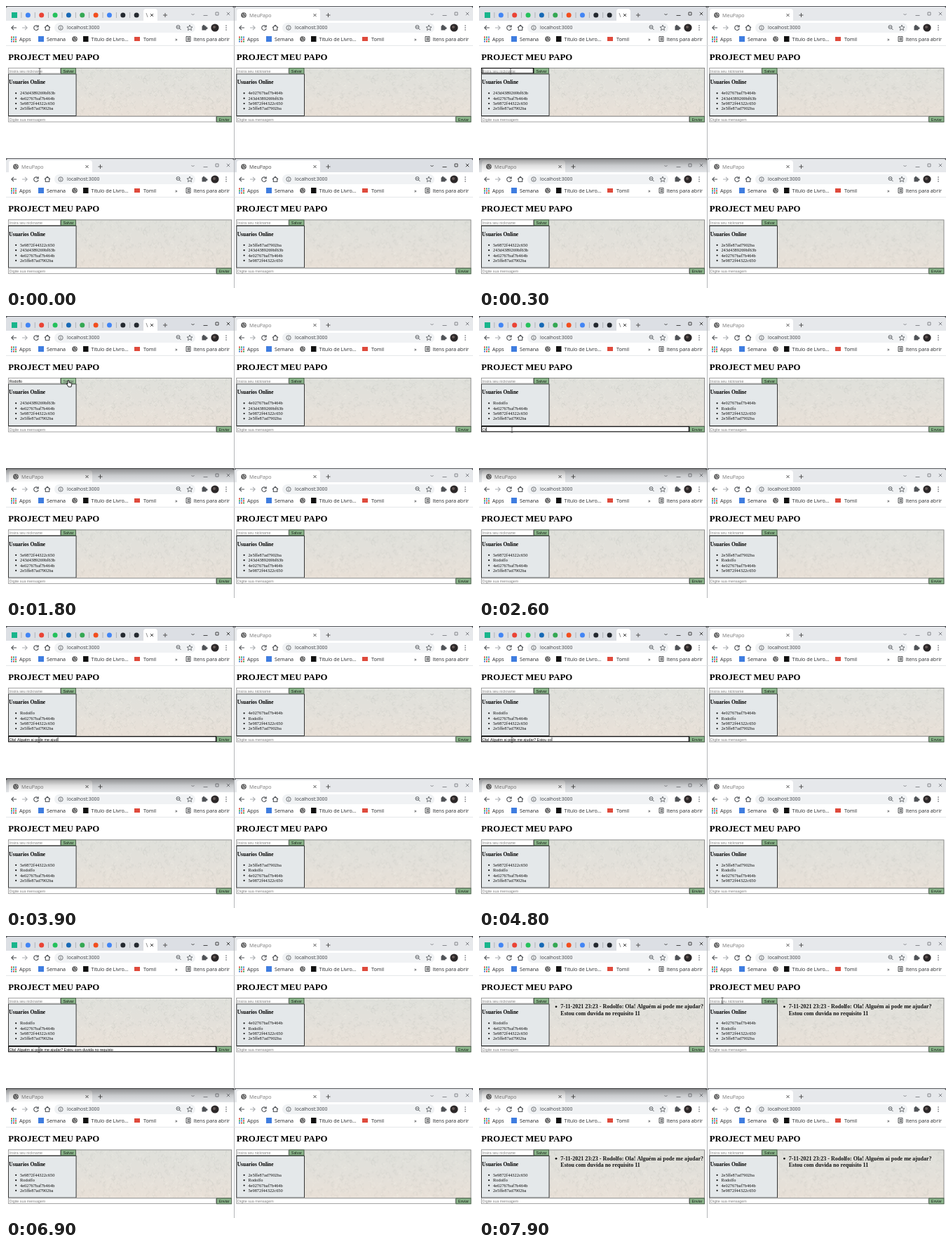
Write an HTML page with a canvas that moves like this. It is 666 by 402 pixels and loops after 8 s.

```html
<!DOCTYPE html>
<html lang="pt">
<head>
<meta charset="utf-8">
<title>Chat demo</title>
<style>
html, body { margin: 0; width: 666px; height: 402px; overflow: hidden; }
canvas { display: block; }
</style>
</head>
<body>
<canvas id="stage" width="666" height="402"></canvas>
<script>
const g = document.getElementById('stage').getContext('2d');
const UI = '"Open Sans", "Noto Sans", sans-serif';
const SERIF = '"Liberation Serif", serif';
const SANS = '"Liberation Sans", sans-serif';
const NAME = 'Rodolfo';
const FIRST = 'Ola! Alguém ai pode me ajudar?';
const DRAFT = FIRST + ' Estou com duvida no requisto';
const SECOND = 'Estou com duvida no requisito 11';
const IDS = ['243d4389269bf63b', '4e02767baf7b464b', '5e9872f44322c650', '2e5ffe87ad7902ba'];
// Listed from back to front
const WINDOWS = [
  { x: 0, y: 216, w: 325, order: [2, 0, 1, 3] },
  { x: 0, y: 0, w: 325, order: [0, 1, 2, 3], tabs: true },
  { x: 325, y: 0, w: 341, order: [1, 0, 2, 3] },
  { x: 325, y: 216, w: 341, order: [3, 0, 1, 2] }
];
const TAB_COLORS = ['#19b58c', '#4285f4', '#ea4335', '#25c15c', '#1769b5',
  '#34a853', '#f24e1e', '#4285f4', '#24292f', '#24292f'];
// [time, value...] keys, linear in between
const TYPING = [[2500, 0], [2700, 4], [3000, 8], [3900, 27], [4900, 40], [5800, 51], [6200, 59], [6900, 59], [7000, 57], [7200, 63]];
const MOUSE = [[0, 48, 93], [300, 45, 93], [1200, 45, 93], [1700, 88, 96], [2000, 88, 96],
  [2400, 47, 162], [7200, 47, 162], [7500, 311, 162], [7600, 311, 162], [7900, 347, 92]];

function at(keys, t) {
  const i = keys.findIndex(k => k[0] > t);
  if (i < 0) return keys[keys.length - 1].slice(1);
  if (i === 0) return keys[0].slice(1);
  const a = keys[i - 1], b = keys[i], p = (t - a[0]) / (b[0] - a[0]);
  return a.slice(1).map((v, j) => v + (b[j + 1] - v) * p);
}

function text(s, x, y, size, color, family = UI, weight = '') {
  g.font = `${weight} ${size}px ${family}`;
  g.fillStyle = color;
  g.fillText(s, x, y);
}

function box(x, y, w, h, fill, stroke, lw = 1) {
  if (fill) { g.fillStyle = fill; g.fillRect(x, y, w, h); }
  if (stroke) {
    g.strokeStyle = stroke;
    g.lineWidth = lw;
    g.strokeRect(x + lw / 2, y + lw / 2, w - lw, h - lw);
  }
}

function round(x, y, w, h, r, fill) {
  g.beginPath();
  g.roundRect(x, y, w, h, r);
  g.fillStyle = fill;
  g.fill();
}

function dot(x, y, r, fill) {
  g.beginPath();
  g.arc(x, y, r, 0, 7);
  g.fillStyle = fill;
  g.fill();
}

function path(d, x, y, color, lw = 1) {
  g.save();
  g.translate(x, y);
  g.strokeStyle = color;
  g.lineWidth = lw;
  g.stroke(new Path2D(d));
  g.restore();
}

const cross = (x, y, r, color) => path(`M${-r} ${-r}L${r} ${r}M${r} ${-r}L${-r} ${r}`, x, y, color);
const plus = (x, y) => path('M-3 0H3M0-3V3', x, y, '#555');

function globe(x, y) {
  dot(x, y, 3.8, '#555');
  path('M-2-2Q0 0-1 2M1-3Q0-1 3 0M0 3Q1 1 2 1', x, y, '#eee', 0.9);
}

function makeWallpaper() {
  const c = document.createElement('canvas');
  c.width = 240;
  c.height = 70;
  const p = c.getContext('2d');
  const grad = p.createLinearGradient(0, 0, 0, 70);
  grad.addColorStop(0, '#dfe0db');
  grad.addColorStop(0.5, '#e3e0da');
  grad.addColorStop(1, '#e9e0d7');
  p.fillStyle = grad;
  p.fillRect(0, 0, 240, 70);
  let seed = 7;
  const rnd = () => (seed = seed * 16807 % 2147483647) / 2147483647;
  p.lineWidth = 0.6;
  for (let i = 0; i < 800; i++) {
    p.strokeStyle = i % 2 ? 'rgba(150,160,155,.18)' : 'rgba(250,246,238,.3)';
    const a = rnd() * 6;
    p.beginPath();
    p.arc(rnd() * 240, rnd() * 70, 1 + rnd() * 2, a, a + 2 + rnd() * 3);
    p.stroke();
  }
  return c;
}
const wallpaper = makeWallpaper();

function drawTabs(win, active) {
  const ink = active ? '#444' : '#85878c', r = win.w - 325;
  if (win.tabs) {
    TAB_COLORS.forEach((color, i) => {
      const x = 12 + i * 19.35;
      if (i === 0) box(x - 4, 9, 8, 8, color);
      else dot(x, 13, 3.5, color);
      if (i < 9) box(x + 9.5, 9, 0.8, 8, '#a3a7ac');
    });
    round(196, 4, 20, 18, [4, 4, 0, 0], '#fff');
    path('M0-3L2 3', 200, 13, '#777', 0.8);
    cross(208, 13, 2, '#444');
    plus(227, 13);
  } else {
    round(4, 4, 119, 18, [4, 4, 0, 0], '#fff');
    globe(14, 13);
    text('MeuPapo', 22, 15.7, 7.1, active ? '#444' : '#777');
    cross(115.5, 13, 2, '#555');
    plus(134.5, 13);
  }
  path('M-2-1L0 1L2-1', 266.5 + r, 12, ink);
  path('M-3 1.5H3', 284.5 + r, 12, ink);
  path('M-2-2H2V2H-2Z', 301 + r, 11, ink);
  cross(317 + r, 11, 2.2, ink);
}

function drawToolbar(r) {
  const ink = '#505357';
  path('M4 0H-3M0-3.2L-3.2 0L0 3.2', 11, 31, ink, 1.1);
  path('M-4 0H3M0-3.2L3.2 0L0 3.2', 27, 31, '#aaadb1', 1.1);
  path('M2.5-2A3.3 3.3 0 1 0 3.2 1M3.2-3.7V-1H.4', 43, 31, ink, 1.1);
  path('M-4 0L0-3.7L4 0M-2.7-.5V3.5H2.7V-.5', 59, 31, ink, 1.1);
  round(69, 24, 201 + r, 14, 7, '#f0f2f4');
  path('M3.2 0A3.2 3.2 0 1 1-3.2 0A3.2 3.2 0 1 1 3.2 0M0-.5V2M0-2V-1.2', 78, 31, ink, 0.8);
  text('localhost:3000', 87, 33.4, 6.9, '#3c3f43');
  path('M2 0A2.5 2.5 0 1 1-3 0A2.5 2.5 0 1 1 2 0M1.3 1.8L3.5 4M-1.8 0H.8', 246 + r, 30, ink, 0.9);
  path('M0-4L1.1-1.2L4-1L1.8.8L2.5 3.7L0 2L-2.5 3.7L-1.8.8L-4-1L-1.1-1.2Z', 262 + r, 31, ink, 0.8);
  box(279.5 + r, 28.5, 6, 6, ink);
  dot(282 + r, 28.3, 1.5, ink);
  dot(286 + r, 31.5, 1.5, ink);
  dot(298 + r, 31, 5.6, '#2c2829');
  dot(297 + r, 30, 2, '#665a58');
  for (let i = -1; i < 2; i++) dot(314 + r, 31 + i * 3, 0.8, ink);
}

function drawBookmarks(r) {
  const ink = '#25272a';
  const label = (s, x) => text(s, x, 49.7, 7.2, ink, UI, 500);
  const colors = ['#e0483b', '#35a45a', '#4a80d8'];
  for (let i = 0; i < 9; i++) box(7 + i % 3 * 3, 43.5 + (i / 3 | 0) * 3, 2, 2, colors[(i + (i / 3 | 0)) % 3]);
  label('Apps', 19);
  box(46, 43, 8, 8, '#3f7de0');
  label('Semana', 58);
  globe(98, 47);
  box(110, 43, 7.5, 8, '#111');
  label('Título de Livro…', 121.5);
  box(183, 44, 8, 6, '#df4a3c');
  label('Tomil', 196);
  label('»', 241 + r);
  path('M-3-3.5H3V3.5H-3ZM-1.5-1.5H2M-1.5 0H2M-1.5 1.5H2', 260 + r, 47, ink, 0.8);
  label('Itens para abrir', 267.5 + r);
  box(0, 56, 325 + r, 0.8, '#dfe1e4');
}

function field(x, y, w, value, hint, focused, caret) {
  box(x, y, w, 8.5, '#fff', focused ? '#111' : '#8c8c8c', focused ? 1.2 : 0.8);
  text(value || hint, x + 1.7, y + 6.5, 5.33, value ? '#111' : '#858585', SANS);
  if (caret) box(x + 2 + (value ? g.measureText(value).width : 0), y + 1.7, 0.7, 5.5, '#111');
}

function button(label, x, y, pressed) {
  box(x, y, 22, 8.7, pressed ? '#9cc49c' : '#8ab58a', '#4c5a4c', 0.9);
  g.textAlign = 'center';
  text(label, x + 11, y + 6.5, 5.33, pressed ? '#555' : '#1b241b', SANS);
  g.textAlign = 'left';
}

function drawPage(win, s) {
  const r = win.w - 325, mine = win.tabs;
  g.translate(win.x ? 0.4 : 0, win.y ? 0.5 : 0);
  text('PROJECT MEU PAPO', 3.3, 76.6, 12.8, '#000', SERIF, 'bold');
  g.drawImage(wallpaper, 0, 0, 222 + r, 69, 100, 88, 222 + r, 69);
  box(3, 88, 319 + r, 69.5, null, '#777', 0.8);
  box(3, 96.5, 97.5, 60.5, '#e4e8ea', '#222', 0.9);
  field(3, 88, 75, mine ? s.nick : '', 'Insira seu nickname', mine && s.nickFocus, mine && s.nickFocus);
  button('Salvar', 78, 88, mine && s.pressed);
  text('Usuarios Online', 4.3, 111.3, 7.5, '#000', SERIF, 'bold');
  win.order.forEach((id, i) => {
    const y = 126.3 + i * 7.35;
    dot(14.2, y - 2, 1.1, '#111');
    text(id === 0 && s.named ? NAME : IDS[id], 20, y, 6.4, '#111', SERIF);
  });
  field(3, 157, 297 + r, mine ? s.message : '', 'Digite sua mensagem', mine && s.messageFocus, mine && s.caret);
  button('Enviar', 300 + r, 157);
  if (s.sent) {
    dot(110, 100.8, 1.4, '#111');
    text(`7-11-2021 23:23 - ${NAME}: ${FIRST}`, 116.3, 103.4, 8, '#111', SERIF, 'bold');
    text(SECOND, 116.3, 112.6, 8, '#111', SERIF, 'bold');
  }
}

function drawShadow(w) {
  const grad = g.createLinearGradient(0, 217, 0, 238);
  grad.addColorStop(0, 'rgba(0,0,0,.42)');
  grad.addColorStop(0.5, 'rgba(0,0,0,.12)');
  grad.addColorStop(1, 'rgba(0,0,0,0)');
  box(0, 217, w, 21, grad);
}

function drawWindow(win, active, s) {
  const top = win.y ? 2 : 1, left = win.x ? 1 : 0;
  g.save();
  g.translate(win.x, win.y);
  if (active) drawShadow(win.w);
  round(left, top, win.w - left, 217 - top, [4, 4, 0, 0], '#fff');
  round(left, top, win.w - left, 21 - top, [4, 4, 0, 0], active ? '#dcdfe4' : '#e6e8eb');
  drawTabs(win, active);
  drawToolbar(win.w - 325);
  drawBookmarks(win.w - 325);
  drawPage(win, s);
  g.restore();
}

function drawMouse(x, y) {
  const onButton = (x > 78 && x < 100 && y < 97) || (x > 300 && x < 322 && y > 157);
  const onField = y < 97 || (y > 157 && x < 300);
  if (onButton) {
    const hand = new Path2D(`M${x} ${y - 4}v5l-2-1 3 5h4l1-5-4-1v-3z`);
    g.fillStyle = '#fff';
    g.fill(hand);
    g.strokeStyle = '#111';
    g.lineWidth = 0.9;
    g.stroke(hand);
  } else if (onField) {
    path('M-1.5-4H1.5M0-4V4M-1.5 4H1.5', x, y, '#444', 0.8);
  } else {
    const arrow = new Path2D(`M${x} ${y}v8l2-2 1.5 3 1-.5-1.3-3h2.8z`);
    g.fillStyle = '#111';
    g.fill(arrow);
  }
}

function messageAt(t) {
  if (t >= 7600) return '';
  const n = Math.round(at(TYPING, t)[0]);
  return (t < 7000 ? DRAFT : FIRST + ' ' + SECOND).slice(0, n);
}

function draw(t) {
  const named = t >= 1900;
  const messageFocus = t >= 2400 && t < 7600;
  const state = {
    named,
    messageFocus,
    nick: named ? '' : NAME.slice(0, Math.max(0, Math.floor((t - 900) / 85))),
    nickFocus: t >= 100 && t < 1800,
    pressed: t >= 1700 && t < 2000,
    message: messageAt(t),
    caret: messageFocus && (t < 6500 || t >= 7000),
    sent: t >= 7600
  };
  const front = WINDOWS[t < 100 ? 3 : 1];
  box(0, 0, 666, 402, '#55575b');
  box(325, 1, 1, 401, '#b4b6b9');
  for (const win of WINDOWS) drawWindow(win, win === front, state);
  drawMouse(...at(MOUSE, t));
}

function tick() {
  draw(Math.floor(performance.now() % 8000 / 100) * 100);
  requestAnimationFrame(tick);
}
tick();
</script>
</body>
</html>
```
